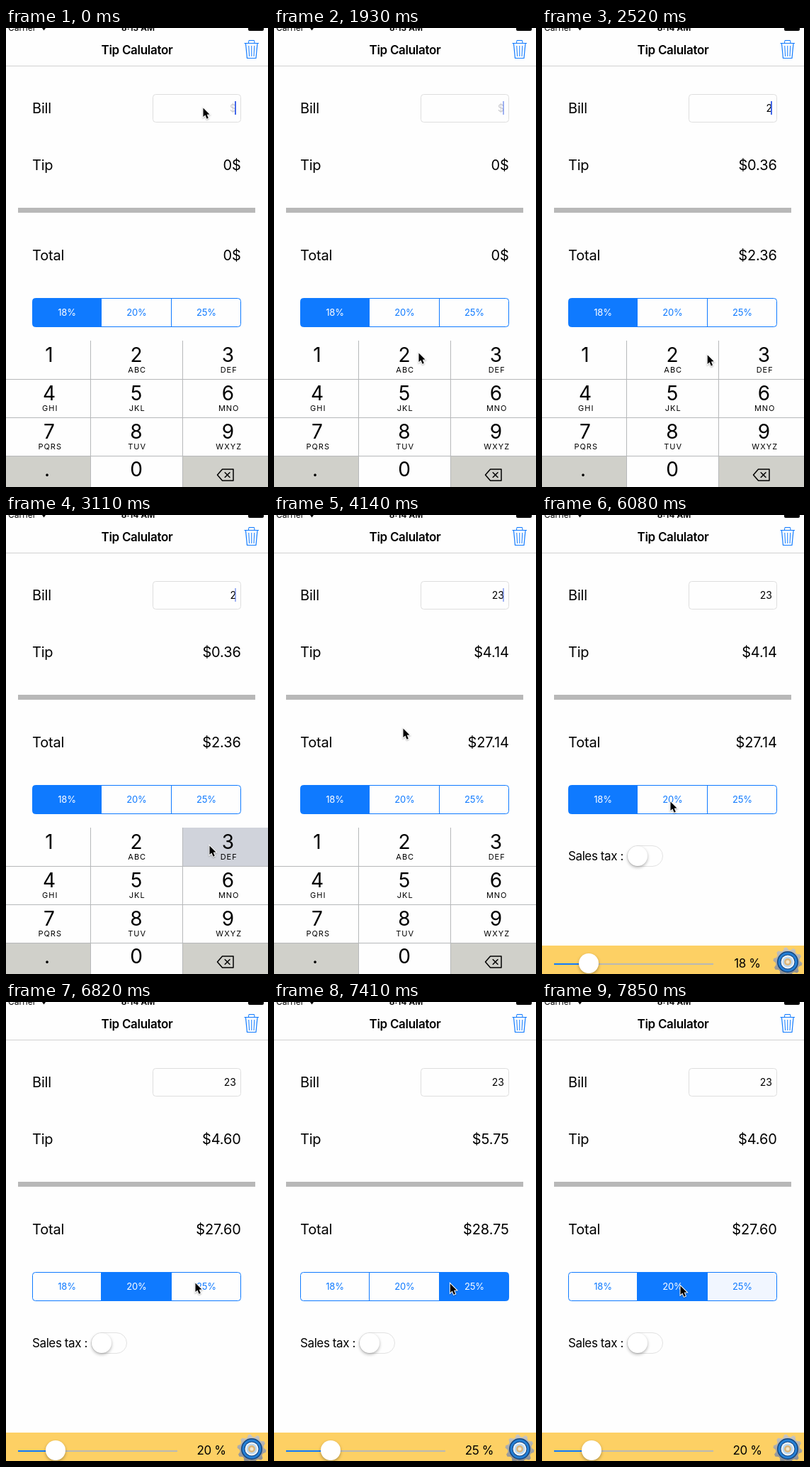
Write an HTML page with a canvas that moves like this. It is 370 px wide and 646 px high and loops after 8 s.

```html
<!DOCTYPE html>
<html lang="en">
<head>
<meta charset="utf-8">
<title>Tip calculator</title>
<style>
html, body { margin: 0; width: 370px; height: 646px; overflow: hidden; background: #fff; }
canvas { display: block; width: 370px; height: 646px; }
</style>
</head>
<body>
<canvas id="stage"></canvas>
<script>
const W = 370, H = 646, LOOP = 8000, STEPS = 54;
const BLUE = '#0f7aff', FONT = 'Inter, Roboto, sans-serif';
const canvas = document.getElementById('stage');
const ratio = window.devicePixelRatio || 1;
canvas.width = W * ratio;
canvas.height = H * ratio;
const c = canvas.getContext('2d');
c.scale(ratio, ratio);

// What the user does, timed in steps
const keyTaps = [{ at: 14, value: 2 }, { at: 21, value: 3 }];
const rateTaps = [{ at: 42, value: 20 }, { at: 48, value: 25 }, { at: 52, value: 20 }];
const dismissAt = 32;
const home = { x: 278, y: 112 };
const moves = [
  { from: 5, to: 11, x: 204, y: 457 },
  { from: 15, to: 20, x: 287, y: 465 },
  { from: 22, to: 28, x: 182, y: 300 },
  { from: 34, to: 35, x: 193, y: 294 },
  { from: 36, to: 41, x: 181, y: 403 },
  { from: 43, to: 46, x: 267, y: 395 },
  { from: 49, to: 52, x: 195, y: 399 }
];

const clamp = v => Math.max(0, Math.min(1, v));
const smooth = k => k * k * (3 - 2 * k);

function pointerAt(s) {
  let { x, y } = home;
  for (const m of moves) {
    const k = smooth(clamp((s - m.from) / (m.to - m.from)));
    x += (m.x - x) * k;
    y += (m.y - y) * k;
  }
  return [x, y];
}

// Seven-step blink, restarted by each key tap
function caretAt(s) {
  if (s >= dismissAt) return 0;
  const start = keyTaps.reduce((last, tap) => tap.at < s ? tap.at + 1 : last, 0);
  return clamp(Math.abs((s - start) % 7 - 4.5) - 1);
}

// Damped slide of the keyboard out of the stage
function slideAt(s) {
  const t = Math.max(0, s - dismissAt + .4) * 1.9;
  return s < dismissAt ? 0 : 216 * (1 - (1 + t) * Math.exp(-t));
}

function text(str, x, y, size, { align = 'left', color = '#000', weight = 400, gap = 0 } = {}) {
  c.font = `${weight} ${size}px ${FONT}`;
  c.letterSpacing = gap + 'px';
  c.textAlign = align;
  c.fillStyle = color;
  c.fillText(str, x, y);
}

function rect(x, y, w, h, color) {
  c.fillStyle = color;
  c.fillRect(x, y, w, h);
}

function disc(x, y, r, color) {
  c.beginPath();
  c.arc(x, y, r, 0, 7);
  c.fillStyle = color;
  c.fill();
}

function box(x, y, w, h, r) {
  c.beginPath();
  c.roundRect(x, y, w, h, r);
}

function poly(points, close) {
  c.beginPath();
  points.forEach(([x, y]) => c.lineTo(x, y));
  if (close) c.closePath();
}

function stroke(color, width = 1) {
  c.strokeStyle = color;
  c.lineWidth = width;
  c.stroke();
}

function knob(x, y) {
  c.save();
  c.shadowColor = 'rgba(0,0,0,.3)';
  c.shadowBlur = 4 * ratio;
  c.shadowOffsetY = 2 * ratio;
  disc(x, y, 14, '#fff');
  c.restore();
}

function header(clock) {
  rect(0, 53, W, 1, '#d2d2d2');
  text('Carrier', 3, 3.5, 12);
  poly([[51, 0], [56, 0], [53.5, 3.5]], true);
  c.fill();
  text(clock, 186.5, 3.5, 12, { align: 'center', weight: 600 });
  box(342, -5, 22, 9, 2);
  c.fillStyle = '#000';
  c.fill();
  text('Tip Calulator', 185, 37, 17, { align: 'center', weight: 600, gap: -.3 });

  poly([[336.5, 21.5], [357, 21.5]]);
  stroke(BLUE);
  poly([[342.5, 21], [343, 17.5], [350.5, 17.5], [351, 21]]);
  stroke(BLUE);
  poly([[338.5, 22], [340.5, 42.5], [353, 42.5], [355, 22]]);
  stroke(BLUE, 1.2);
  for (const d of [-1, 0, 1]) {
    poly([[346.8 + d * 4, 25], [346.8 + d * 3.2, 40]]);
    stroke(BLUE);
  }
}

function bill(str, caret) {
  box(207.5, 93.5, 124, 39, 4);
  stroke('#dedede');
  text(str || '$', 325, 118, 14, { align: 'right', color: str ? '#000' : '#c9c9ce' });
  c.globalAlpha = caret;
  rect(323, 103, 2, 19, '#4468e8');
  c.globalAlpha = 1;
}

function segments(rate, pressed, fading) {
  const width = 98.5;
  c.save();
  box(37.5, 380.5, 294, 40, 4);
  c.clip();
  [18, 20, 25].forEach((value, i) => {
    const x = Math.floor(37 + i * width), on = value === rate;
    const fill = on ? BLUE : value === pressed ? '#dbebff' : value === fading ? '#f1f6ff' : '#fefefe';
    rect(x, 380, width + 1, 41, fill);
    if (i) rect(x - 1, 380, 1, 41, BLUE);
    text(value + '%', 86 + i * width, 405, 13, { align: 'center', color: on ? '#fff' : BLUE, gap: -.2 });
  });
  c.restore();
  box(37.5, 380.5, 294, 40, 4);
  stroke(BLUE);
}

function gear(x, y) {
  const teeth = 10;
  c.save();
  c.translate(x, y);
  const metal = c.createLinearGradient(0, -20, 0, 20);
  metal.addColorStop(0, '#c9c8c5');
  metal.addColorStop(1, '#85878a');
  c.beginPath();
  for (let i = 0; i < teeth * 4; i++) {
    const a = (i + .5) * Math.PI / teeth / 2, r = i % 4 < 2 ? 20.5 : 17;
    c.lineTo(r * Math.cos(a), r * Math.sin(a));
  }
  c.closePath();
  c.fillStyle = metal;
  c.fill();
  disc(0, 0, 15, '#14457f');
  disc(0, 0, 13.5, '#2580d6');
  disc(0, 0, 10.5, '#123f78');
  disc(0, 0, 9.5, '#eef5fb');
  disc(0, 0, 7.5, '#bcd7ee');
  disc(0, 0, 5, '#dcb579');
  disc(0, 0, 2.5, '#f4e6c8');
  c.restore();
}

function settings(rate) {
  text('Sales tax :', 37, 486, 17, { gap: -.4 });
  box(120.5, 465.5, 50, 29, 14.5);
  stroke('#e2e2e2');
  knob(135, 480);

  rect(0, 606, W, 40, '#fdd064');
  const x = 30 + rate * 2;
  rect(17, 631, x - 17, 2, BLUE);
  rect(x, 631, 242 - x, 2, '#b9b9b5');
  knob(x, 631);
  text(rate + ' %', 290, 637, 17, { align: 'center', gap: -.4 });
  gear(347, 629);
}

function keyboard(pressed) {
  const names = ' ABC DEF GHI JKL MNO PQRS TUV WXYZ'.split(' ');
  const mids = [61, 184, 313.5];
  rect(0, 440, W, 216, '#b6b8ba');
  for (let i = 0; i < 12; i++) {
    const col = i % 3, row = Math.floor(i / 3);
    const x = Math.max(0, 130 * col - 10), y = 440 + 54 * row;
    const fill = i === 9 || i === 11 ? '#d0d0ca' : i + 1 === pressed ? '#d0d3db' : '#fefefe';
    rect(x, y + (row ? 1 : 0), 130 * col + 119 - x, row ? 53 : 54, fill);
    text(['.', '0', ''][i - 9] ?? i + 1, mids[col] - (i === 9 ? 3 : 0), y + 30 - (row === 3 ? 1 : 0), 28, { align: 'center' });
    if (row < 3) text(names[i], mids[col] + 1.2, y + 45, 11, { align: 'center', gap: 1 });
  }
  c.lineJoin = 'round';
  poly([[298.5, 629], [305.5, 621], [321, 621], [321, 637], [305.5, 637]], true);
  stroke('#000', 1.5);
  for (const d of [-3.8, 3.8]) {
    poly([[312.6 - d, 625.2], [312.6 + d, 632.8]]);
    stroke('#000', 1.5);
  }
  c.lineJoin = 'miter';
}

function pointer(x, y) {
  c.save();
  c.translate(x + .5, y + .5);
  poly([[0, 0], [0, 12.6], [2.9, 10], [5.1, 15.2], [7.3, 14.2], [5.2, 9.3], [9, 9]], true);
  c.shadowColor = 'rgba(0,0,0,.3)';
  c.shadowBlur = 2 * ratio;
  c.shadowOffsetY = ratio;
  stroke('#fff', 2);
  c.shadowColor = 'transparent';
  c.fillStyle = '#000';
  c.fill();
  c.restore();
}

function draw(s) {
  const done = taps => taps.filter(tap => tap.at < s).map(tap => tap.value);
  const held = taps => taps.find(tap => tap.at === s)?.value;
  const typed = done(keyTaps).join('');
  const rates = [18, ...done(rateTaps)];
  const rate = rates.at(-1);
  const justSet = rateTaps.some(tap => tap.at === s - 1);
  const money = v => typed ? '$' + v.toFixed(2) : '0$';
  const right = { align: 'right', gap: -.1 };

  rect(0, 0, W, H, '#fefefe');
  header(s < 16 ? '8:13 AM' : '8:14 AM');
  ['Bill', 'Tip', 'Total'].forEach((label, i) => text(label, 37, [120, 200, 327][i], 20, { gap: -.2 }));
  bill(typed, caretAt(s));
  text(money(typed * rate / 100), 331.8, 200, 20, right);
  rect(17, 253, 335, 7, '#b8b8b8');
  text(money(typed * (100 + rate) / 100), 331.8, 327, 20, right);
  segments(rate, held(rateTaps), justSet ? rates.at(-2) : 0);
  settings(rate);

  const slide = Math.round(slideAt(s));
  if (slide < 206) {
    c.save();
    c.translate(0, slide);
    keyboard(held(keyTaps));
    c.restore();
  }
  pointer(...pointerAt(s));
}

function tick(now) {
  const t = now % LOOP;
  draw(Math.min(STEPS - 1, Math.floor((t + 8) * STEPS / LOOP)));
  requestAnimationFrame(tick);
}
draw(0);
requestAnimationFrame(tick);
</script>
</body>
</html>
```
